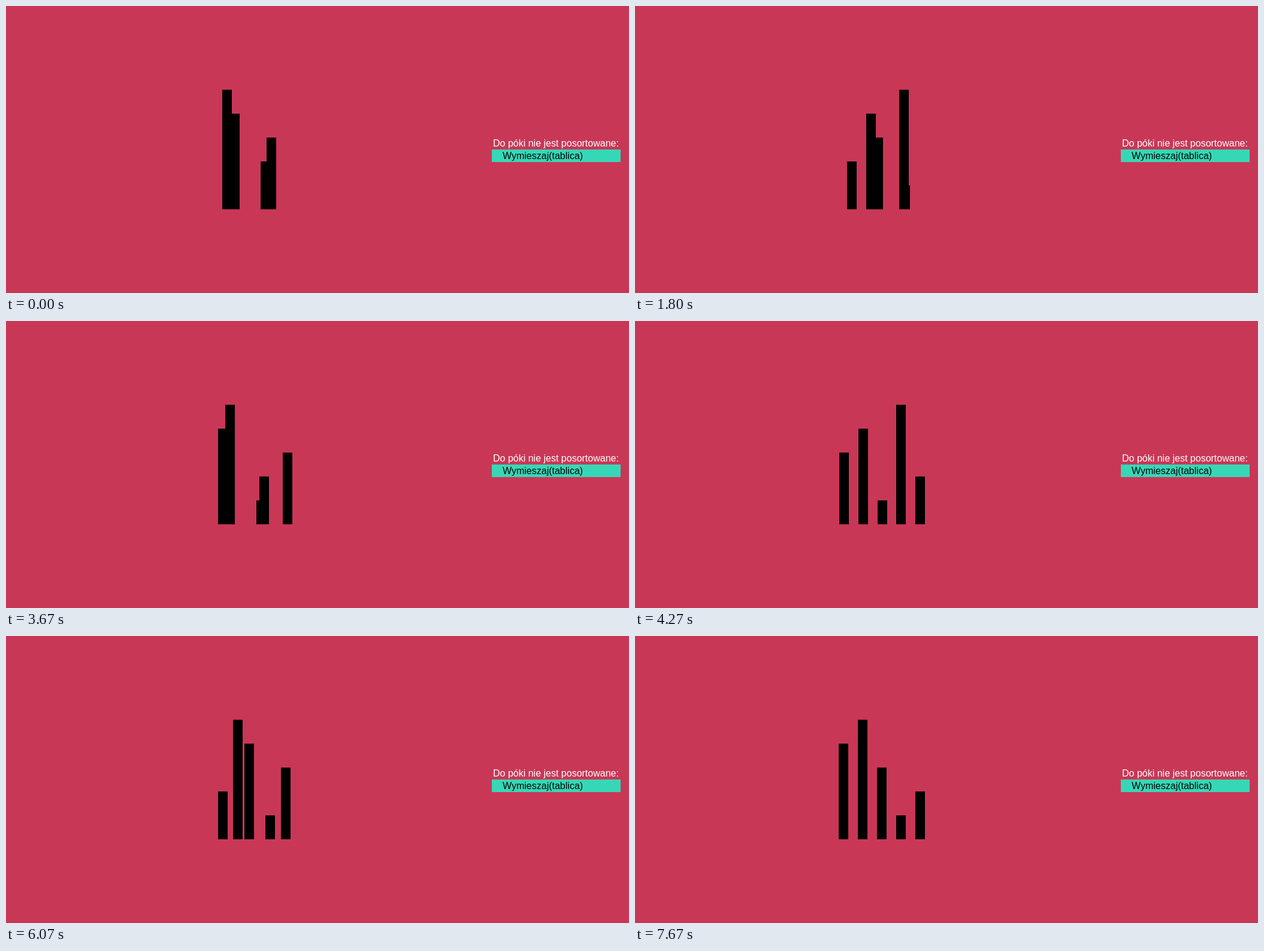
An HTML page that plays this animation: 1040x480 px, repeating every 8000 ms.

```html
<!DOCTYPE html>
<html lang="pl">
<head>
<meta charset="utf-8">
<title>Bogosort</title>
<style>
  html, body { margin: 0; width: 100%; height: 100%; overflow: hidden; background: #c93756; }
  svg { display: block; }
  text { font: 16px "Liberation Sans", Arial, sans-serif; white-space: pre; }
</style>
</head>
<body>
<svg width="1040" height="480" viewBox="0 0 1040 480">
  <g id="bars"></g>
  <text x="813" y="235" fill="#fff">Do póki nie jest posortowane:</text>
  <rect x="811" y="240" width="215" height="21" fill="#36d7b7"/>
  <text x="829" y="256">Wymieszaj(tablica)</text>
  <path id="cursor" d="M.5 .5V16.5L4.5 13L7 18.5L9 17.5L6.8 12.2H11.5Z" fill="#fff" stroke="#000"/>
</svg>
<script>
const LOOP = 8000, FPS = 15;
const FIRST = 17.75, PERIOD = 7.25, MOVE = 3; // in picture steps
const LEFT = 340, GAP = 32, BASE = 340, UNIT = 40, WIDTH = 16;

// Bar order before the first shuffle and after each one.
const orders = [
  '45123', '53241', '24315', '51423', '31254', '45123', '52431', '34152',
  '15243', '41325', '25413', '43152', '21534', '53241', '45312'
];

const cursor = document.getElementById('cursor');
const bars = [1, 2, 3, 4, 5].map(value => {
  const bar = document.createElementNS('http://www.w3.org/2000/svg', 'rect');
  const height = value * UNIT;
  const attrs = { y: BASE - height, width: WIDTH, height };
  for (const name in attrs) bar.setAttribute(name, attrs[name]);
  document.getElementById('bars').append(bar);
  return bar;
});

const clamp = (v, lo, hi) => Math.min(hi, Math.max(lo, v));
const ease = t => t * t * t * (10 + t * (6 * t - 15));

function drawBars(step) {
  const last = orders.length - 2;
  const i = clamp(Math.floor((step - FIRST) / PERIOD), 0, last);
  const p = ease(clamp((step - FIRST - i * PERIOD - 0.003) / MOVE, 0, 1));
  bars.forEach((bar, n) => {
    const from = orders[i].indexOf(n + 1), to = orders[i + 1].indexOf(n + 1);
    const x = LEFT + GAP * (from + (to - from) * p);
    bar.setAttribute('x', Math.ceil(x - 0.05));
  });
}

function drawCursor(step) {
  const n = step - 19;
  cursor.style.display = n >= 0 && n < 4 ? '' : 'none';
  cursor.setAttribute('transform', `translate(${788 + 23 * n} ${343 + Math.round(30.6 * n)})`);
}

function draw(ms) {
  const step = Math.floor((ms % LOOP + 5) * FPS / 1000) % (LOOP * FPS / 1000);
  drawBars(Math.max(step, 19)); // the opening pose is held
  drawCursor(step);
}

const start = performance.now();
function tick() {
  draw(performance.now() - start);
  requestAnimationFrame(tick);
}
tick();
</script>
</body>
</html>
```
